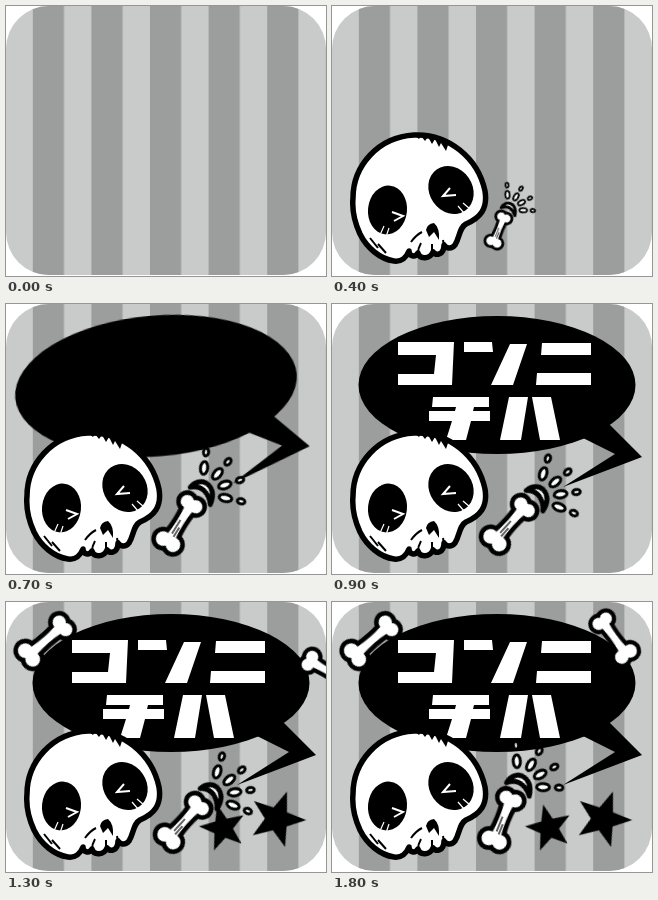
An HTML page that plays this animation: 320 px wide and 270 px high, repeating every 2000 ms.

```html
<!DOCTYPE html>
<html lang="ja">
<head>
<meta charset="utf-8">
<title>コンニチハ</title>
<style>
  html, body { margin: 0; width: 100%; height: 100%; overflow: hidden; background: #fff; }
  svg { display: block; width: 320px; height: 269px; border-radius: 43px; background: #c9cbca; }

  .line { fill: #fff; stroke: #000; stroke-linejoin: round; }
  .bone { stroke-width: 10; paint-order: stroke; }

  /* Every pose is held for 100 ms, one step is 5% */
  .anim { animation: 2s step-end infinite; }
  #skull { animation-name: skull; }
  #hand { animation-name: hand; }
  #bubble { animation-name: bubble; }
  #row1 { animation-name: row1; }
  #row2 { animation-name: row2; }
  #star1 { animation-name: star1; }
  #star2 { animation-name: star2; }
  #boneL { animation-name: boneL; }
  #boneR { animation-name: boneR; }

  @keyframes skull {
    0% { transform: translate(90px, 257px) scale(0); }
    10% { transform: translate(90px, 257px) scale(.55); }
    15% { transform: translate(90px, 257px) scale(1.1); }
    20%, 100% { transform: translate(90px, 257px); }
  }
  @keyframes hand {
    0% { transform: scale(0); }
    15% { transform: translate(160px, 236px) rotate(22deg) scale(.3); }
    20% { transform: translate(160px, 236px) rotate(22deg) scale(.6); }
    25% { transform: translate(159px, 237px) rotate(22deg) scale(.8); }
    30%, 50%, 70%, 90% { transform: translate(159px, 238px) rotate(22deg); }
    35%, 55%, 75% { transform: translate(159px, 237px) rotate(32deg); }
    40%, 60%, 80% { transform: translate(159px, 235px) rotate(50deg); }
    45%, 65%, 85% { transform: translate(160px, 235px) rotate(42deg); }
  }
  @keyframes bubble {
    0% { transform: scale(0); }
    25% { transform: translate(272px, 74px) rotate(30deg) scale(.5); }
    30% { transform: translate(216px, 79px) rotate(17deg) scale(.9); }
    35% { transform: translate(150px, 82px) rotate(-5deg) scale(1.02); }
    40%, 100% { transform: translate(165px, 81px); }
  }
  @keyframes row1 { 0% { opacity: 0; } 40%, 100% { opacity: 1; } }
  @keyframes row2 { 0% { opacity: 0; } 45%, 100% { opacity: 1; } }
  @keyframes star1 {
    0% { transform: scale(0); }
    55% { transform: translate(217px, 226px) rotate(-60deg) scale(.35); }
    60% { transform: translate(217px, 226px) rotate(-35deg) scale(.7); }
    65%, 100% { transform: translate(217px, 226px) rotate(-14deg) scale(1.05); }
  }
  @keyframes star2 {
    0% { transform: scale(0); }
    55% { transform: translate(271px, 217px) rotate(60deg) scale(.4); }
    60% { transform: translate(271px, 217px) rotate(40deg) scale(.85); }
    65%, 100% { transform: translate(271px, 217px) rotate(20deg) scale(1.27); }
  }
  @keyframes boneL {
    0% { transform: scale(0); }
    55% { transform: translate(-18px, 72px) rotate(70deg) scale(.92); }
    60% { transform: translate(8px, 60px) rotate(60deg) scale(.92); }
    65%, 100% { transform: translate(23px, 53px) rotate(49deg) scale(.92); }
  }
  @keyframes boneR {
    0% { transform: scale(0); }
    65% { transform: translate(339px, 79px) rotate(-60deg) scale(.84); }
    70% { transform: translate(312px, 62px) rotate(-48deg) scale(.84); }
    75%, 100% { transform: translate(294px, 52px) rotate(-36deg) scale(.84); }
  }
</style>
</head>
<body>
<svg viewBox="0 0 320 269" role="img" aria-label="コンニチハ">
  <defs>
    <path id="bone" class="line bone" d="M-5-8A8 8 0 1 0 0 5A8 8 0 1 0 5-8Q3-26 5-41A7.200 7.200 0 1 0 0-53A7.200 7.200 0 1 0-5-41Q-3-26-5-8Z"/>
    <path id="star" d="M0-23L5.6-7.7 21.9-7.1 9.1 2.9 13.5 18.6 0 9.5-13.5 18.6-9.1 2.9-21.9-7.1-5.6-7.7Z"/>
    <g id="ray" class="line" stroke-width="3">
      <ellipse cy="-25" rx="3.600" ry="6.400"/>
      <ellipse cy="-41" rx="2.600" ry="3.800"/>
    </g>
    <pattern id="stripes" x="26.8" width="58.6" height="270" patternUnits="userSpaceOnUse">
      <rect width="31.2" height="270" fill="#9c9e9d"/>
    </pattern>
  </defs>

  <rect width="320" height="270" fill="url(#stripes)"/>

  <g id="bubble" class="anim">
    <ellipse rx="138.5" ry="69"/>
    <path d="M84 52L118 69 66 102 145 72 112 39 90 40Z"/>
  </g>

  <g fill="#fff">
    <g id="row1" class="anim">
      <path d="M66 38H122L120 81H66V70H102L104 51H66Z"/>
      <path d="M132 38H160L161 48H132ZM178 40H195L181 81H159Z"/>
      <path d="M210 39H259V51H209ZM205 69H259V81H204Z"/>
    </g>
    <g id="row2" class="anim">
      <path d="M101 93H157V103H142L141 107H158V117H139L134 136H114L120 117H97V107H123L124 103H100Z"/>
      <path d="M177 93H196L189 136H168ZM200 93H219L228 136H208Z"/>
    </g>
  </g>

  <use id="star1" class="anim" href="#star"/>
  <use id="star2" class="anim" href="#star"/>
  <use id="boneL" class="anim" href="#bone"/>
  <use id="boneR" class="anim" href="#bone"/>

  <g id="skull" class="anim">
    <g transform="translate(-90 -257)">
      <path class="line" stroke-width="5.5" d="M21 192C21 160 46 131 82 129C116 127 146 152 153 185C156 203 148 212 134 218C127 222 128 231 123 239C119 244 114 242 112 239C112 249 104 250 101 246C98 253 88 254 86 247C83 252 77 250 77 245C74 252 70 256 62 255C48 253 35 242 28 228C22 215 20 203 21 192Z"/>
      <path d="M82 129L87 133 89 130 93 135 96 131 100 138 103 133 107 141 109 137 114 145 116 139 100 129Z"/>
      <ellipse cx="55.500" cy="204" rx="19.500" ry="24.500" transform="rotate(6 55.500 204)"/>
      <ellipse cx="119" cy="184" rx="21.500" ry="25" transform="rotate(-35 119 184)"/>
      <path d="M94 224Q95 218 102 217 108 222 107 234L102 226 97 231Z"/>
      <path d="M89 237Q86 242 86 248M100 238V246M111 234L112 240M38 232L46 242M46 238L54 247M90 226Q84 229 79 236" fill="none" stroke="#000" stroke-width="2"/>
      <g fill="none" stroke="#fff" stroke-width="2">
        <path d="M60 206L71 210 62 215M118 182L111 190 124 189"/>
        <path d="M48 229L52 220M54 231L57 222M132 207L126 200M138 203L131 197" stroke-width="1.200"/>
      </g>
    </g>
  </g>

  <g id="hand" class="anim">
    <g transform="translate(5 -60)">
      <use href="#ray" transform="rotate(-25)"/>
      <use href="#ray" transform="rotate(9)"/>
      <use href="#ray" transform="rotate(40)"/>
      <use href="#ray" transform="rotate(70)"/>
      <path class="line" stroke-width="5" d="M-12 1C-10-15 11-16 14 5C7-4-3-7-12 1Z"/>
    </g>
    <use href="#bone" transform="translate(3 -1) scale(.92)"/>
    <path d="M2-10V-26M5-8V-19" stroke="#000" stroke-width="1.200"/>
  </g>
</svg>
</body>
</html>
```
